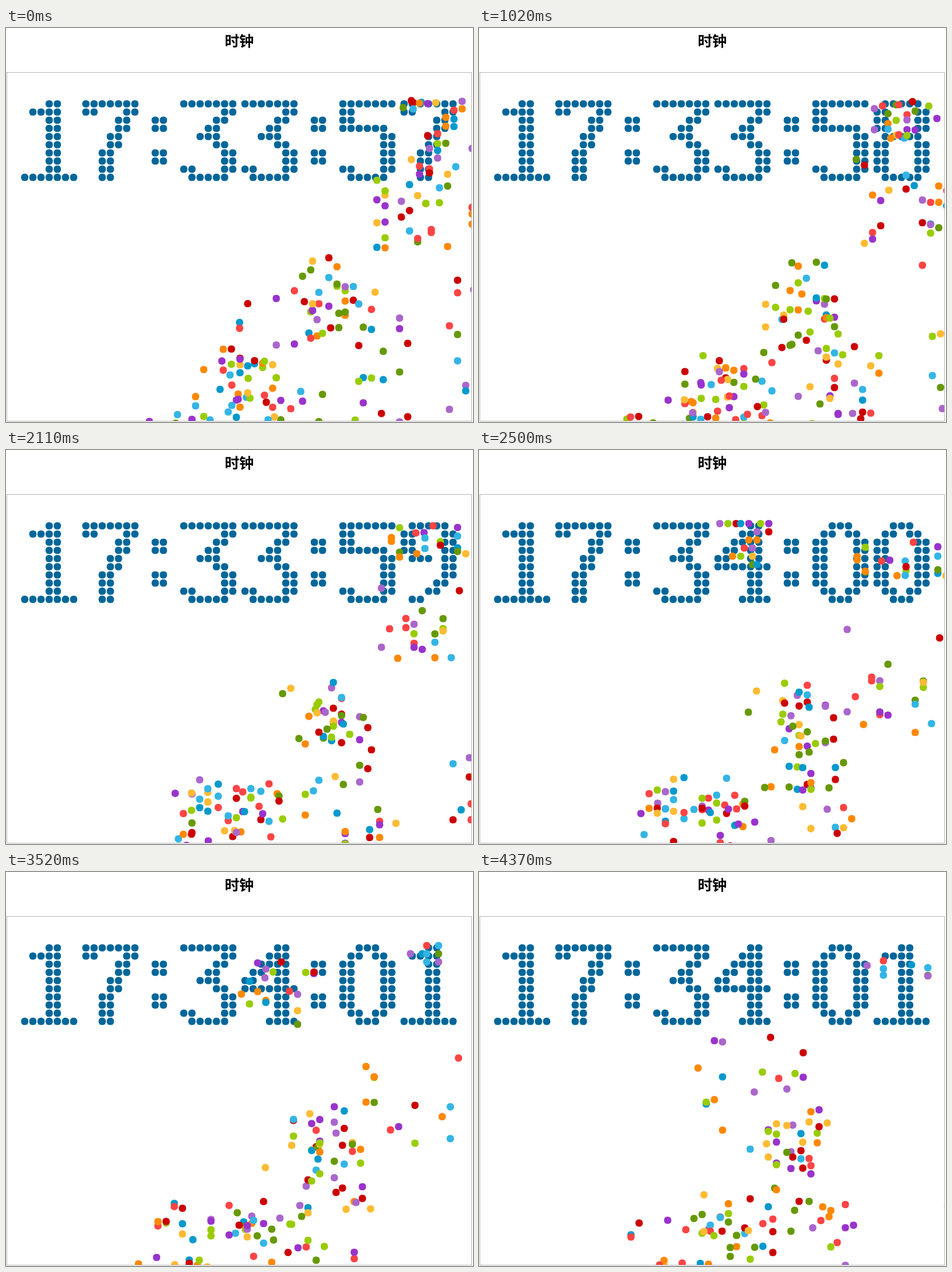
Recreate the animation shown at these times as an HTML page with a canvas. Size 815 px wide and 687 px high, loop 4.44 s.

```html
<!DOCTYPE html>
<html lang="zh">
<head>
<meta charset="utf-8">
<title>时钟</title>
<style>
  html, body { margin: 0; width: 100%; height: 100%; overflow: hidden; background: #fff; }
  h1 {
    position: absolute; left: 0; top: 0; width: 814px; margin: 0;
    font: bold 25.3px/42px "Noto Sans CJK SC", "Noto Sans CJK", sans-serif;
    text-align: center; color: #000;
  }
  canvas { display: block; }
</style>
</head>
<body>
<h1>时钟</h1>
<canvas id="stage" width="815" height="687"></canvas>
<script>
const ctx = document.getElementById('stage').getContext('2d');
const LOOP = 4440, SCALE = 810 / 1024, CELL = 18, FLOOR = 1016;
const COLORS = ['#33B5E5', '#0099CC', '#AA66CC', '#9933CC', '#99CC00',
                '#669900', '#FFBB33', '#FF8800', '#FF4444', '#CC0000'];

// Lit columns of each digit, row by row
const GLYPHS = [
  '234 1245 0156 0156 0156 0156 0156 0156 1245 234',
  '34 1234 34 34 34 34 34 34 34 0123456',
  '12345 0156 56 45 34 23 12 01 0156 0123456',
  '0123456 56 45 34 234 45 56 56 0156 12345',
  '45 345 2345 1245 0145 0123456 45 45 45 3456',
  '0123456 01 01 012345 56 56 56 56 0156 12345',
  '45 23 12 01 01345 0156 0156 0156 0156 12345',
  '0123456 0156 45 45 34 34 23 23 23 23',
  '12345 0156 0156 0156 12345 0156 0156 0156 0156 12345',
  '12345 0156 0156 0156 12356 56 56 45 34 12'
];
const COLON = '  12 12   12 12';
const SLOTS = [0, 15, 39, 54, 78, 93];

const dots = (glyph, slot) => glyph.split(' ').flatMap((row, r) =>
  [...row].map(c => [39 + slot * 9 + c * CELL, 69 + r * CELL]));

// Steps come every 74 ms, with a 92 ms pause after every third or fourth
const stepTime = k => Math.max(70, 74 * (k - 1) + 92 * Math.floor((k + 0.5) / 3.555));

function stepAt(t) {
  let k = 0;
  while (k < 45 && stepTime(k + 1) <= t) k++;
  return k;
}

let seed = 20;
function random() {
  seed = (seed * 1664525 + 1013904223) % 4294967296;
  return seed / 4294967296;
}

const balls = [];
function burst(second, slot, digit, limit = Infinity) {
  for (const [x, y] of dots(GLYPHS[digit], slot).slice(0, limit)) {
    balls.push({
      x, y,
      born: (second - 57) * 10 - 5,
      vx: random() < 0.5 ? -4 : 4,
      g: 1.5 + random(),
      color: COLORS[Math.floor(random() * COLORS.length)]
    });
  }
}

for (let s = 41; s < 58; s++) {
  if (s === 50) burst(s, 78, 4);
  burst(s, 93, s % 10);
}
// The stage is nearly full by now, so later bursts are cut short
burst(58, 93, 8, 22);
burst(59, 93, 9, 18);
burst(60, 54, 3, 18);
burst(61, 93, 1, 8);

function height(ball, age) {
  let y = ball.y, vy = -5;
  for (let i = 0; i < age; i++) {
    y += vy;
    vy += ball.g;
    if (y >= FLOOR) {
      y = FLOOR;
      vy *= -0.75;
    }
  }
  return y;
}

function dot(x, y, color) {
  ctx.fillStyle = color;
  ctx.beginPath();
  ctx.roundRect(x - 8, y - 8, 16, 16, 7);
  ctx.fill();
}

function draw(step) {
  ctx.clearRect(0, 0, 815, 687);
  ctx.save();
  ctx.beginPath();
  ctx.rect(2, 78, 810, 607);
  ctx.clip();
  ctx.translate(1.8, 77.7);
  ctx.scale(SCALE, SCALE);

  const total = 33 * 60 + 57 + Math.floor((step + 4) / 10);
  const pad = n => String(n).padStart(2, '0');
  const digits = '17' + pad(Math.floor(total / 60)) + pad(total % 60);
  const face = SLOTS.flatMap((slot, i) => dots(GLYPHS[digits[i]], slot));
  face.push(...dots(COLON, 30), ...dots(COLON, 69));
  for (const [x, y] of face) dot(x, y, '#006699');

  for (const ball of balls) {
    const age = step - ball.born;
    if (age > 0) dot(ball.x + ball.vx * age, height(ball, age), ball.color);
  }
  ctx.restore();
  ctx.strokeStyle = '#b4b4b4';
  ctx.strokeRect(1.5, 77.5, 811, 608);
}

let shown = -1;
const start = performance.now();
function tick() {
  const step = stepAt((performance.now() - start) % LOOP);
  if (step !== shown) draw(shown = step);
  requestAnimationFrame(tick);
}
tick();
</script>
</body>
</html>
```
